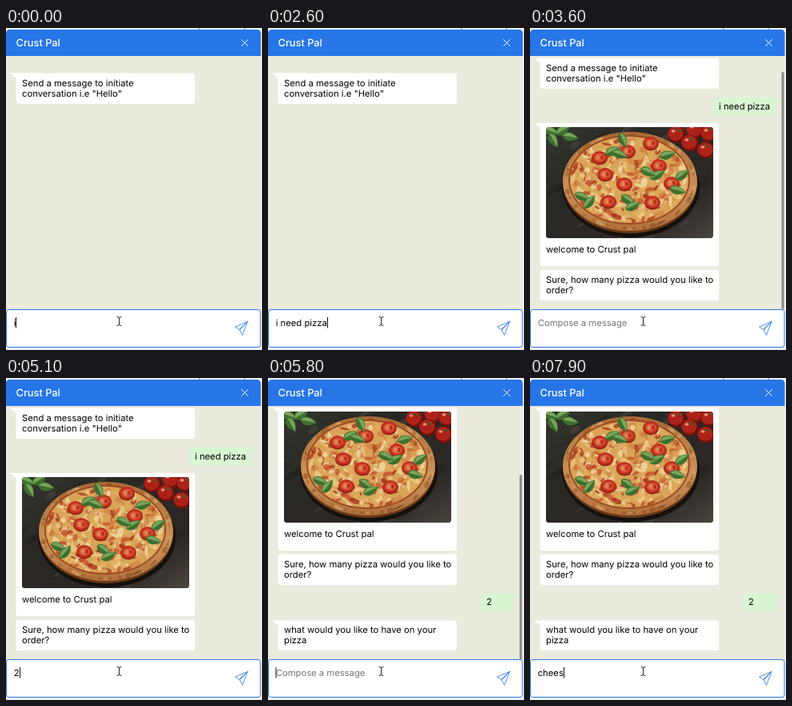
Recreate the animation shown at these times as an HTML page. Size 320x403 px, loop 8 s.

```html
<!DOCTYPE html>
<html lang="en">
<head>
<meta charset="utf-8">
<title>Chat</title>
<style>
  html, body { margin: 0; width: 100%; height: 100%; overflow: hidden; background: #f4f4f6; }
  svg { display: block; width: 320px; height: 403px; }
  text { font: 11.25px Inter, sans-serif; fill: #000; text-rendering: geometricPrecision; }
  .title { font-size: 12.8px; font-weight: 500; fill: #fff; }
  .line { fill: none; stroke-width: 1; stroke-linejoin: round; stroke-linecap: round; }
</style>
</head>
<body>
<svg viewBox="0 0 320 403">
  <defs>
    <clipPath id="photoClip"><rect width="209" height="139" rx="4"/></clipPath>
    <clipPath id="cheeseClip"><ellipse cx="104" cy="66" rx="74" ry="54"/></clipPath>
    <filter id="soft" x="0" y="0" width="1" height="1"><feGaussianBlur stdDeviation=".7"/></filter>
    <linearGradient id="table" x2="1" y2="1">
      <stop offset="0" stop-color="#33352e"/><stop offset=".35" stop-color="#2a2825"/>
      <stop offset=".75" stop-color="#2b2724"/><stop offset="1" stop-color="#4a443e"/>
    </linearGradient>
    <linearGradient id="crust" x2="0" y2="1">
      <stop offset="0" stop-color="#a96a34"/><stop offset=".6" stop-color="#cc935a"/>
      <stop offset="1" stop-color="#b0703a"/>
    </linearGradient>
  </defs>
  <rect y="35" width="318.5" height="320" fill="#eaeade"/>
  <g id="log"></g>
  <rect id="thumb" x="314.5" width="3" rx="1.5" fill="#575757"/>
  <rect width="320" height="6" fill="#f4f4f6"/>
  <path d="M241.5 0v2M298.5 0v2" stroke="#888"/>
  <path d="M0 35V7q0-5 5-5H313.5q5 0 5 5V35z" fill="#2676e8"/>
  <text class="title" x="12.5" y="23">Crust Pal</text>
  <path class="line" d="M294.5 14.5l8 8m0-8l-8 8" stroke="#fff"/>
  <rect y="398" width="320" height="5" fill="#f4f4f6"/>
  <rect x=".5" y="352.5" width="317.5" height="47" rx="3" fill="#fff" stroke="#2676e8"/>
  <text id="entry" x="9.7" y="373"></text>
  <rect id="caret" y="362" width="1" height="13.5" fill="#111"/>
  <path class="line" d="M139 361.500q2.500 0 2.500 1.500v8q0 1.500-2.500 1.500m5-11q-2.500 0-2.500 1.500m0 8q0 1.500 2.500 1.500" stroke="#222"/>
  <path class="line" d="M302 367.5L286.5 374l5.5 3.5zM302 367.5L295.5 384.5 292 377.5z" stroke="#4a8eee"/>
</svg>
<script>
const LOOP = 8000, STEP = 100;
const byId = id => document.getElementById(id);

let seed = 11;
const random = () => (seed = seed * 16807 % 2147483647) / 2147483647;
const pick = list => list[Math.floor(random() * list.length)];

const ellipse = (x, y, rx, ry, fill, angle = 0, more = '') =>
  `<ellipse rx="${rx}" ry="${ry}" fill="${fill}" transform="translate(${x} ${y}) rotate(${angle})" ${more}/>`;

const slice = ([x, y]) =>
  ellipse(x, y + 1, 10, 8.5, '#8a1f14') + ellipse(x, y, 9.5, 7.8, '#c2301f') +
  ellipse(x, y, 6.5, 5, '#dc5a3c') + ellipse(x - 2, y, 2, 3, '#d98a50') + ellipse(x + 3, y, 1.7, 2.7, '#b8281a');

const leaf = ([x, y, angle]) =>
  `<g transform="translate(${x} ${y}) rotate(${angle})">
    <path d="M-10 0Q-4-11 11 0Q-3 11-10 0z" fill="#3d7030"/>
    <path d="M-9 0Q-3-9 10 0z" fill="#7aa45a"/></g>`;

const cherry = ([x, y]) =>
  ellipse(x, y, 11, 10.5, '#6f120d') + ellipse(x - 1, y - 1, 9.5, 9, '#ad2218') +
  ellipse(x - 4, y - 4, 2.5, 1.8, '#e89080') + ellipse(x + 2, y - 5, 4, 1, '#4a5a26', 25);

function pizza() {
  const scatter = (count, rx, ry, make) => Array.from({ length: count }, () => {
    const a = random() * Math.PI * 2, r = Math.sqrt(random());
    return make(104 + Math.cos(a) * r * rx, 66 + Math.sin(a) * r * ry);
  }).join('');
  const topping = scatter(320, 74, 54, (x, y) => ellipse(x, y, 2 + random() * 5, 1 + random() * 2.5,
    pick(['#ecc983', '#e0ae5c', '#f2dfae', '#eed59a', '#c4532c', '#d08040', '#a8341c']), random() * 180, 'opacity=".75"'));
  const char = Array.from({ length: 60 }, () => {
    const a = random() * Math.PI * 2;
    return ellipse(105 + Math.cos(a) * 80, 68 + Math.sin(a) * 59, 2 + random() * 4, 1 + random() * 2,
      pick(['#7d431c', '#dcae74', '#a5632c']), a * 57 + 90, 'opacity=".5"');
  }).join('');
  const stone = Array.from({ length: 45 }, () => ellipse(random() * 209, random() * 139,
    4 + random() * 14, 1 + random() * 3, pick(['#6b655d', '#171614']), -30, 'opacity=".25"')).join('');
  return `<g transform="translate(20 143)" clip-path="url(#photoClip)">
    <rect width="209" height="139" fill="url(#table)"/>
    <g filter="url(#soft)">
    <rect width="209" height="139" fill="url(#table)"/>${stone}
    ${[[186, 4], [163, 9], [204, 8], [180, 20], [200, 29]].map(cherry).join('')}
    ${[[6, 5, 20], [21, 4, -30], [9, 16, 60], [30, 12, 10]].map(leaf).join('')}
    ${ellipse(106, 75, 86, 63, '#14110e')}
    ${ellipse(105, 71, 84, 62, '#6b3817')}
    ${ellipse(105, 68, 84, 62, 'url(#crust)')}${char}
    ${ellipse(104, 66, 76, 56, '#9c4822')}
    ${ellipse(104, 66, 74, 54, '#d9a457')}
    <g clip-path="url(#cheeseClip)">${topping}</g>
    ${[[131, 20], [102, 30], [67, 38], [74, 59], [141, 48], [98, 71], [78, 93], [157, 70], [133, 94]].map(slice).join('')}
    ${[[96, 16, 65], [83, 30, -25], [92, 34, 20], [139, 60, -30], [127, 56, 25], [151, 35, -15], [45, 87, 20],
       [54, 94, -50], [102, 91, 35], [108, 99, -25], [164, 79, 15], [170, 60, -35]].map(leaf).join('')}
    </g>
  </g>`;
}

const label = (x, y, text) => `<text x="${x}" y="${y}">${text}</text>`;
const bubble = (y, height, tail) =>
  `<rect x="12.5" y="${y}" width="223.5" height="${height}" rx="3" fill="#fff"/>` +
  (tail ? `<path d="M5 ${y}h12v6h-4.5z" fill="#fff"/>` : '');
const reply = (x, y, text) =>
  `<path d="M${x} ${y}H314L306.500 ${y + 7}V${y + 22.5}H${x}z" fill="#d8f6d2"/>` + label(x + 7, y + 14.5, text);

const messages = [
  [0, bubble(56.5, 38.5, true) + label(20, 72.5, 'Send a message to initiate') + label(20, 86, 'conversation i.e "Hello"')],
  [2800, reply(229, 106, 'i need pizza')],
  [3000, bubble(138, 179, true) + pizza() + label(20, 300, 'welcome to Crust pal') +
         bubble(321.5, 38.5) + label(20, 337.5, 'Sure, how many pizza would you like to') + label(20, 351, 'order?')],
  [5300, reply(266, 370.5, '2')],
  [5400, bubble(404.5, 37.5, true) + label(20, 419.5, 'what would you like to have on your') + label(20, 433, 'pizza')]
].map(([time, markup]) => {
  const group = document.createElementNS('http://www.w3.org/2000/svg', 'g');
  group.innerHTML = markup;
  byId('log').append(group);
  return { time, group };
});

// Each phrase is typed one character per listed time, then cleared.
const phrases = [
  { text: 'i need pizza', keys: [0, 300, 500, 800, 900, 1200, 1300, 1800, 2000, 2200, 2400, 2600], sent: 2800 },
  { text: '2', keys: [5000], sent: 5300 },
  { text: 'chees', keys: [7000, 7200, 7400, 7600, 7900], sent: LOOP }
];
// Scrollbar appears, starts fading, is gone.
const thumbShows = [[3000, 3500, 3800], [4500, 4700, 5000], [5400, 5700, 6000], [6900, 7000, 7400]];

const clamp = v => Math.max(0, Math.min(1, v));
const ease = p => p < .5 ? 4 * p ** 3 : 1 - 4 * (1 - p) ** 3;
const glide = (t, start) => ease(clamp((t - start) / 400));

function typedText(t) {
  const phrase = phrases.find(p => t >= p.keys[0] && t < p.sent);
  return phrase ? phrase.text.slice(0, phrase.keys.filter(k => k <= t).length) : '';
}

function render(t) {
  const scroll = 19 * glide(t, 3100) + 82 * glide(t, 5252);
  byId('log').setAttribute('transform', `translate(0 ${-scroll})`);
  for (const { time, group } of messages) group.style.display = t >= time ? '' : 'none';

  const [limit, height] = t < 5300 ? [19, 297] : [101, 231];
  const show = thumbShows.find(([start, , end]) => t >= start && t < end);
  const thumb = byId('thumb');
  thumb.setAttribute('height', height);
  thumb.setAttribute('y', 36 + scroll / limit * (316 - height));
  thumb.style.opacity = show ? clamp((show[2] - t) / (show[2] - show[1])) : 0;

  const typed = typedText(t), entry = byId('entry'), caret = byId('caret');
  entry.textContent = (typed || 'Compose a message').replace(/ /g, '\u00a0');
  entry.style.fill = typed ? '#000' : '#767676';
  caret.setAttribute('x', typed ? Math.round(9.7 + entry.getComputedTextLength()) : 9.5);
  caret.style.opacity = t >= 2800 && t < 4500 ? 0 : 1;
}

function tick(now) {
  render(Math.floor(now % LOOP / STEP) * STEP);
  requestAnimationFrame(tick);
}
render(0);
requestAnimationFrame(tick);
</script>
</body>
</html>
```
